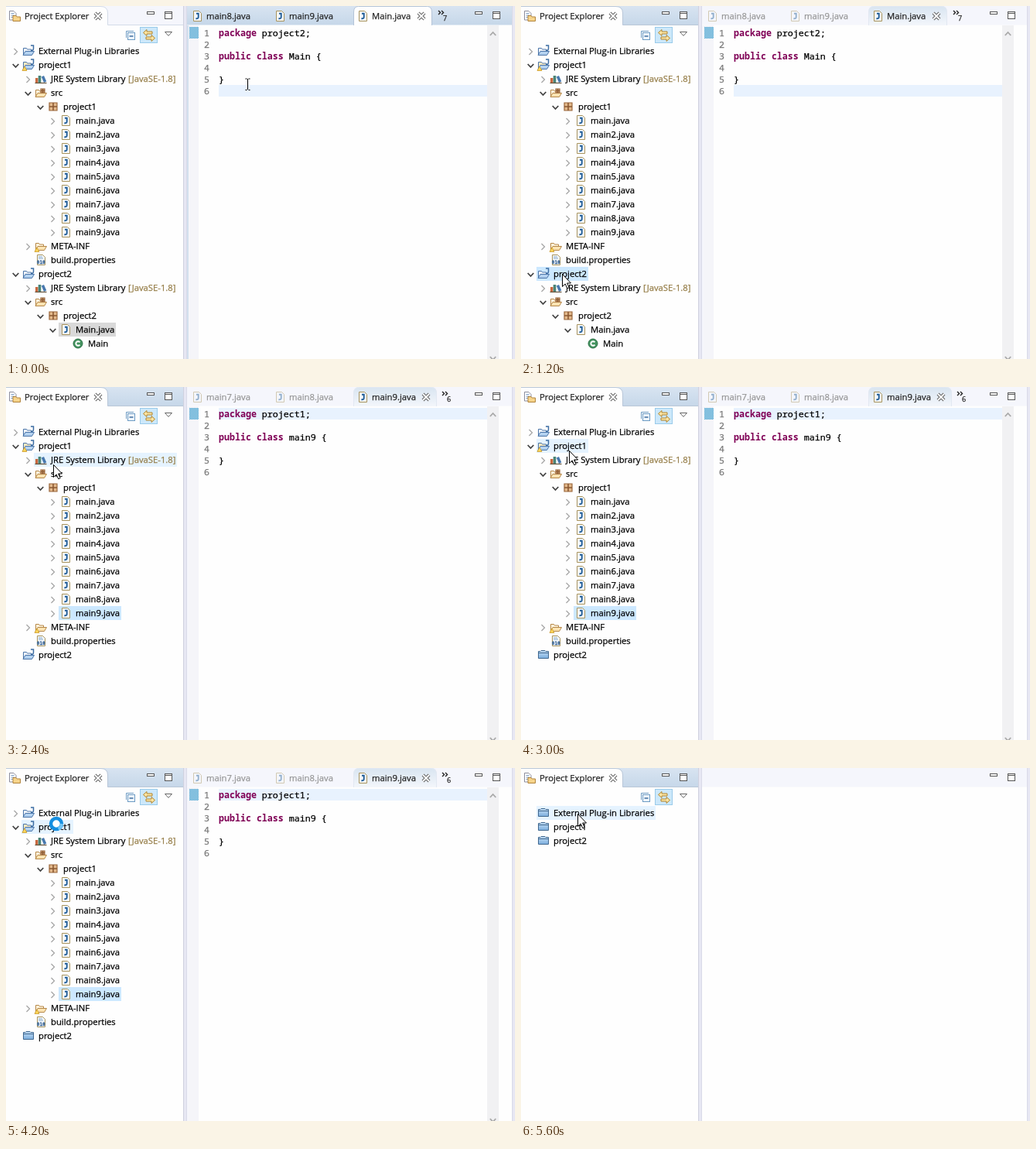
These frames come from a looping animation (658 px wide and 456 px high, 6800 ms). An HTML page:

```html
<!DOCTYPE html>
<html lang="en">
<head>
<meta charset="utf-8">
<title>Closing projects</title>
<style>
  html, body { margin: 0; width: 100%; height: 100%; overflow: hidden; background: #e7e7f3; }
  svg { display: block; width: 658px; height: 456px; }
  text { font: 11.25px "Open Sans", "Noto Sans", sans-serif; white-space: pre; stroke-width: .25; }
  .code { font: 11.65px "Noto Sans Mono", "DejaVu Sans Mono", monospace; }
  .key { font-weight: bold; fill: #7f0055; stroke: none; }
  .bits { font: bold 6px "DejaVu Sans Mono", monospace; }
  .small { font-size: 9px; }
</style>
</head>
<body>
<svg id="stage" viewBox="0 0 658 456">
  <defs>
    <linearGradient id="strip" x2="0" y2="1">
      <stop stop-color="#d8e4f1"/><stop offset="1" stop-color="#c6d7e9"/>
    </linearGradient>
    <linearGradient id="dimTab" x2="0" y2="1">
      <stop stop-color="#d9e5f1"/><stop offset="1" stop-color="#f3f6fb"/>
    </linearGradient>
    <linearGradient id="folderBlue" x2="0" y2="1">
      <stop stop-color="#c4def4"/><stop offset="1" stop-color="#7caede"/>
    </linearGradient>
    <pattern id="checker" width="2" height="2" patternUnits="userSpaceOnUse">
      <path d="M0 0h2v2h-2z" fill="#b4dcee"/><path d="M0 0h1v1h-1zM1 1h1v1h-1z" fill="#52a3cf"/>
    </pattern>
  </defs>
  <g id="scene"></g>
</svg>
<script>
const LOOP = 6800, TICK = 200;
const FOCUS_AT = 1200, FIRST_CLOSE = 1600, FIRST_ICON = 2600, SECOND_CLOSE = 4400, LAST_CLOSE = 5400;
const PAPER = '#fefefe', PALE = '#f5f6fc';

const rect = (x, y, w, h, fill, extra = '') =>
  `<rect x="${x}" y="${y}" width="${w}" height="${h}" fill="${fill}" ${extra}/>`;
const path = (d, fill = 'none', stroke = 'none', width = 1) =>
  `<path d="${d}" fill="${fill}" stroke="${stroke}" stroke-width="${width}"/>`;
const text = (x, y, s, fill = '#000', cls = '') =>
  `<text x="${x}" y="${y}" fill="${fill}" stroke="${fill}" class="${cls}">${s}</text>`;
const at = (x, y, body, extra = '') => `<g transform="translate(${x} ${y})" ${extra}>${body}</g>`;

// Icons are centred on 0,0 in a 16 px box.
const warning = path('M-8 7.5L-5 2L-2 7.5z', '#ffd75a', '#c99a2b', .8);
const openFolder = (back, front, line) =>
  path('M-6.5 5V-3.5h4l1 1.5h5V5z', back, line) + path('M-7 5.5L-4 .5H7.5L4.5 5.5z', front, line);
const page = path('M-4.5-6.5H2.5L5.5-3.5V6.5H-4.5z', '#f4f8fd', '#a8935c');
const orange = openFolder('#fff4dc', '#fbe3b2', '#b58748');
const grid = s => path(`M${-s}-${s}h${2 * s}v${2 * s}h${-2 * s}z`, '#e3b98c', '#9a663b', 1.2) +
  path(`M0-${s}V${s}M${-s} 0H${s}`, 'none', '#8b5932', 1.6);
const project = back => openFolder(back, '#b3d1ef', '#4a74a8') +
  path('M3-7h3.5v4q0 2.5-3 2.2', 'none', '#3c6da3', 1.5);
const icons = {
  open: project('#f1f5fb'),
  warned: project('#fbeac2') + warning,
  closed: path('M-6.5 4.5V-4.5H-4l1-1H2l1 1H6.5V4.5z', 'url(#folderBlue)', '#41688f') +
    path('M-7-2.5H7', 'none', '#41688f'),
  library: rect(-7, -1, 3.5, 6.5, '#c9683e') + rect(-3.3, -4, 3.6, 9.5, '#4b8578') +
    path('M.8-2.5L4-4L7.3 3.5L4 5z', '#4878ae') + path('M-7.5 5.5H7.5', 'none', '#64533b', 1.2),
  source: orange + at(2.5, -2.5, grid(2.5)),
  pkg: grid(5),
  java: page + path('M-1-3.2H1.7V1.2Q1.7 3.7-1.6 3.2', 'none', '#1f5c98', 1.9),
  folder: orange + warning,
  props: page + path('M-3-4H2M-3-2H3', 'none', '#86a8ca') + text(-5.2, 5, '010', '#2c5a8c', 'bits'),
  cls: '<circle r="6" fill="#43935f" stroke="#2d7146"/>' +
    path('M2.4-1.7A2.8 2.8 0 1 0 2.4 1.7', 'none', '#fff', 2),
};

const row = (level, icon, label, caret = '', note = '') => ({ level, icon, label, caret, note });
const jre = () => row(1, 'library', 'JRE System Library', '>', '[JavaSE-1.8]');
const mainName = n => `main${n > 1 ? n : ''}.java`;

function treeRows(t) {
  const rows = [t < LAST_CLOSE ? row(0, 'open', 'External Plug-in Libraries', '>')
    : row(0, 'closed', 'External Plug-in Libraries')];
  if (t < SECOND_CLOSE) {
    rows.push(row(0, 'warned', 'project1', 'v'), jre(), row(1, 'source', 'src', 'v'), row(2, 'pkg', 'project1', 'v'));
    for (let n = 1; n <= 9; n++) rows.push(row(3, 'java', mainName(n), '>'));
    rows.push(row(1, 'folder', 'META-INF', '>'), row(1, 'props', 'build.properties'));
  } else rows.push(row(0, 'closed', 'project1'));
  if (t < FIRST_CLOSE) {
    rows.push(row(0, 'open', 'project2', 'v'), jre(), row(1, 'source', 'src', 'v'),
      row(2, 'pkg', 'project2', 'v'), row(3, 'java', 'Main.java', 'v'), row(4, 'cls', 'Main'));
  } else rows.push(row(0, t < FIRST_ICON ? 'open' : 'closed', 'project2'));
  return rows;
}

const ruler = document.createElement('canvas').getContext('2d');
function labelWidth(label) {
  ruler.font = '11.25px "Open Sans", "Noto Sans", sans-serif';
  return Math.round(ruler.measureText(label).width);
}

function drawTree(t, cursor) {
  const selected = t < FOCUS_AT ? ['Main.java', '#d9d9d9']
    : t < FIRST_CLOSE ? ['project2', '#cce8ff']
    : t < SECOND_CLOSE ? ['main9.java', '#cce8ff'] : [];
  return treeRows(t).map(({ level, icon, label, caret, note }, i) => {
    const x = 42 + 16 * level, y = 58 + 18 * i;
    const right = note ? 221 : x + labelWidth(label) + 2;
    const hovered = cursor.kind !== 'beam' && Math.abs(cursor.y - y) <= 9 && cursor.x >= x - 22 && cursor.x < right;
    const isSelected = label === selected[0] && (label !== 'project2' || level === 0);
    const fill = isSelected ? selected[1] : hovered ? '#e5f3ff' : '';
    const arrow = caret === '>' ? path('M-2-4L2 0L-2 4', 'none', '#a6a6a6', 1.3)
      : caret ? path('M-3.8-2L0 2L3.8-2', 'none', '#444', 1.8) : '';
    return (fill ? rect(x - 22, y - 9, right - x + 22, 18, fill) : '') +
      at(x - 29.5, y + 1, arrow) + at(x - 13, y, icons[icon]) + text(x, y + 4, label) +
      (note ? text(158, y + 4, note, '#957d47') : '');
  }).join('');
}

const closeMark = (x, y) => at(x, y,
  path('M-4-4L4 4M4-4L-4 4', 'none', '#686868', 4) +
  path('M-4-4L4 4M4-4L-4 4', 'none', '#fff', 1.8));
const windowButtons = x => rect(x - 4.5, 7.5, 9, 3, '#fff', 'stroke="#555"') +
  rect(x + 18.5, 7.5, 9, 9, '#fff', 'stroke="#555"') + path(`M${x + 18} 9.5h10`, 'none', '#555');
const tabShape = (left, right) => `M${left} 25V8Q${left} .5 ${left + 6} .5H${right - 6}Q${right} .5 ${right} 8V25`;

function drawExplorerFrame(active) {
  return rect(0, 0, 229, 456, PAPER) + rect(0, 0, 229, 24.5, active ? 'url(#strip)' : PALE) +
    path('M0 25V.5H122Q131.5 .5 131.5 9V25z', PAPER) +
    path('M0 .5H122Q131.5 .5 131.5 9V24.5H229', 'none', active ? '#b9c7d8' : '#d3dbe8') +
    path('M229.5 0V456', 'none', '#cfd1df') +
    at(11, 13, path('M-6.5-6.5H-1L2-3.5V5H-6.5z', '#fff', '#8b8c9b') +
      path('M-4.5-3.5h4M-4.5-1h4M-4.5 1.5h4', 'none', '#7799c2') +
      path('M-2 6.5V-.5H2L3.2 1H7.5V6.5z', '#f6d48b', '#b1833a')) +
    text(24, 17, 'Project Explorer', '#222') + closeMark(119, 13) + windowButtons(187) +
    at(161, 38, path('M-5.5 3V-5.5H4', 'none', '#6d9bc3') +
      rect(-3.5, -3.5, 9, 9, '#eef6fd', 'stroke="#6d9bc3"') + path('M-1.5 1H3.5', 'none', '#24598e', 1.3)) +
    rect(173.5, 27.5, 22, 20, '#cce8fa', 'stroke="#9acbea"') +
    at(185, 38, path('M-7.5-3.5L-3-7.5V-5H4V-2H-3V.5z', '#fbe5a3', '#b1842f') +
      path('M7.5 3.5L3 7.5V5H-4V2H3V-.5z', '#fbe5a3', '#b1842f')) +
    path('M205.5 33.5H214.5L210 38.5z', '#fff', '#666');
}

function drawTabs(t, active) {
  const names = t < FIRST_CLOSE ? ['main8.java', 'main9.java', 'Main.java'] : ['main7.java', 'main8.java', 'main9.java'];
  const [right, mark, hidden] = t < FIRST_CLOSE ? [550.5, 559, 7] : [556.5, 564, 6];
  const labels = names.map((name, i) => {
    const x = 247 + 107 * i, dim = !active && i < 2;
    return at(x, 13, icons.java, dim ? 'opacity=".45"' : '') +
      text(x + 12, 17, name, dim ? '#969696' : '#222');
  }).join('');
  return path(tabShape(449.5, right), active ? PAPER : 'url(#dimTab)', active ? '#b4c4d8' : '#e2e8f2') + labels +
    closeMark(right - 13.5, 13) +
    path(`M${mark} 6l2.5 2.5l-2.5 2.5M${mark + 4} 6l2.5 2.5l-2.5 2.5`, 'none', '#222', 1.4) +
    text(mark + 6, 19, hidden, '#222', 'small');
}

function drawEditor(t, active) {
  const frame = rect(234, 0, 420, 456, PAPER) + rect(234, 0, 420, 24.5, active ? 'url(#strip)' : PALE) +
    path('M233.5 0V456M654.5 0V456', 'none', '#d9dae8');
  if (t >= SECOND_CLOSE) return frame + windowButtons(611);
  const first = t < FIRST_CLOSE;
  const key = s => `<tspan class="key">${s}</tspan>`;
  const lines = [`${key('package')} project${first ? 2 : 1};`, '',
    `${key('public')} ${key('class')} ${first ? 'Main' : 'main9'} {`, '', '}', ''];
  const code = lines.map((line, i) =>
    text(256, 39 + 15 * i, i + 1, '#787878', 'code') + text(275, 39 + 15 * i, line, '#000', 'code')).join('');
  return frame + drawTabs(t, active) + windowButtons(611) +
    rect(234, 25, 2, 431, active ? '#d3e0ee' : PALE) + rect(236, 25, 13, 431, '#f5f5f9') +
    rect(237, 27, 12, 15, 'url(#checker)') +
    rect(275, first ? 102 : 27, 347, 15, '#e8f2fe') +
    rect(622, 25, 15, 431, '#f1f1f3') +
    path('M625.8 38L629.5 34L633.2 38M625.8 453L629.5 457L633.2 453', 'none', '#a9a9a9', 1.8) + code;
}

const route = [
  [0, 312, 101, 'beam'], [200, 288, 138, 'beam'], [400, 205, 226, 'arrow'], [600, 112, 310, 'arrow'],
  [800, 58, 342, 'arrow'], [1000, 50, 338, 'arrow'], [1400, 55, 353, 'arrow'], [1800, 55, 353, 'arrow'],
  [2400, 61, 100, 'arrow'], [2800, 62, 82, 'arrow'], [3800, 65, 72, 'busy'], [4400, 66, 73, 'arrow'],
  [4800, 73, 59, 'arrow'], [LOOP, 73, 59, 'arrow'],
];
function cursorAt(t) {
  const i = route.findIndex((p, n) => n + 1 === route.length || t < route[n + 1][0]);
  const a = route[i], b = route[i + 1] || a;
  const holds = a[0] === 2800 || a[3] === 'busy';
  const k = holds || a === b ? 0 : (t - a[0]) / (b[0] - a[0]);
  return { x: Math.round(a[1] + (b[1] - a[1]) * k), y: Math.round(a[2] + (b[2] - a[2]) * k), kind: a[3] };
}
function drawCursor({ x, y, kind }, t) {
  const shape = kind === 'beam'
    ? path('M-2.5-7H-.5M1.5-7H3.5M.5-7V7M-2.5 7.5H-.5M1.5 7.5H3.5', 'none', '#000')
    : kind === 'arrow' ? path('M.5.5V16.5L4.2 13L6.8 18.8L9.2 17.7L6.6 12H11.5z', '#fff', '#000')
    : '<circle r="7" fill="#fff" stroke="#168fe0" stroke-width="4.5"/>' +
      `<g transform="rotate(${t * .45 % 360})">${path('M0-7A7 7 0 0 1 6.5-2.6', 'none', '#71c6f7', 4)}</g>`;
  return at(x, y, shape);
}

const scene = document.getElementById('scene');
let shown = -1;
function play(now) {
  const step = Math.floor(now % LOOP / TICK);
  if (step !== shown) {
    shown = step;
    const t = step * TICK, cursor = cursorAt(t), editing = t < FOCUS_AT;
    scene.innerHTML = drawExplorerFrame(!editing) + drawTree(t, cursor) + drawEditor(t, editing) + drawCursor(cursor, t);
  }
  requestAnimationFrame(play);
}
play(performance.now());
</script>
</body>
</html>
```
